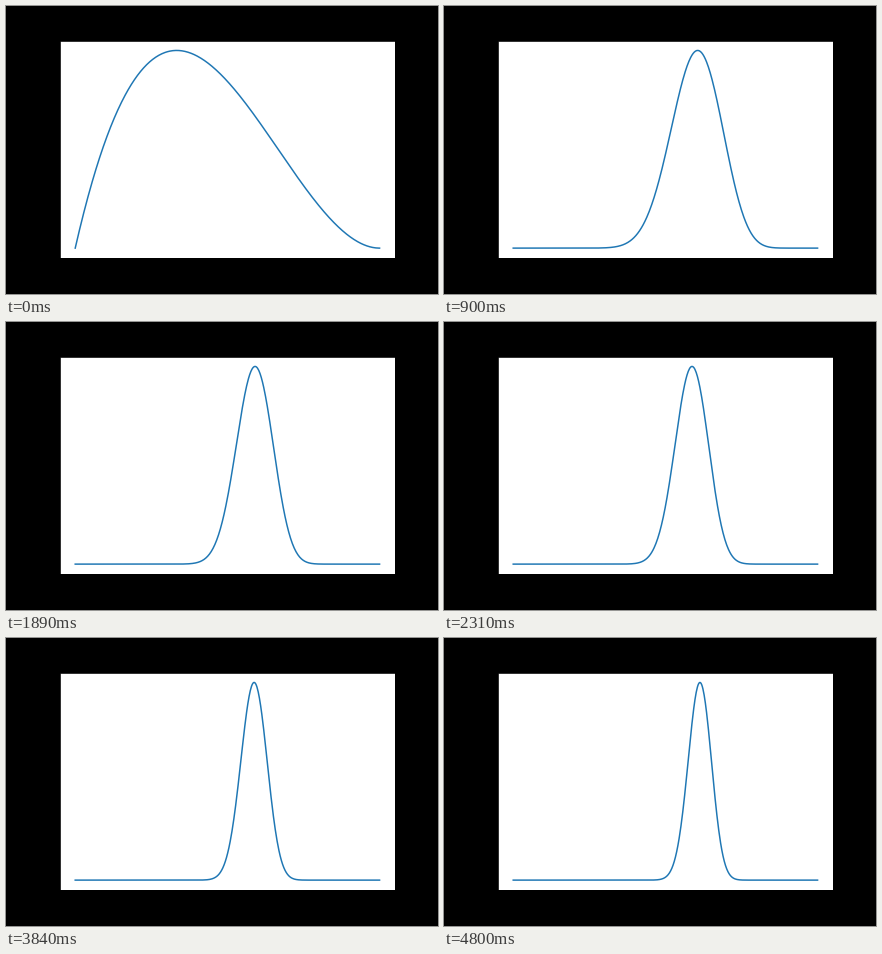
These frames come from a looping animation (432x288 px, 4830 ms). A matplotlib script:

```python
import numpy as np
import matplotlib.pyplot as plt
from matplotlib.animation import FuncAnimation

FRAMES, INTERVAL = 161, 30
FIRST_TOSSES = 3

# Running head count of a biased coin at a few toss counts.
TOSSES = [3, 33, 40, 52, 80, 94, 107, 131, 147, 163]
HEADS = [1, 20, 25, 30, 47, 55, 60, 77, 90, 100]

p = np.linspace(0, 1, 500)


def posterior(heads, tosses):
    """Beta density of the coin's bias, scaled to a peak of one."""
    density = p**heads * (1 - p)**(tosses - heads)
    return density / density.max()


def update(frame):
    tosses = FIRST_TOSSES + frame
    heads = int(np.floor(np.interp(tosses, TOSSES, HEADS) + 0.5))
    line.set_data(p, posterior(heads, tosses))
    return (line,)


fig, ax = plt.subplots(figsize=(6, 4), dpi=72, facecolor="black")
fig.subplots_adjust(left=0.125, right=0.9, bottom=0.125, top=0.88)
ax.set(xlim=(-0.05, 1.05), ylim=(-0.05, 1.05), xticks=[], yticks=[])
line, = ax.plot([], [], color="#1f77b4", lw=1.5)

anim = FuncAnimation(fig, update, frames=FRAMES, interval=INTERVAL,
                     repeat=True, repeat_delay=0)
plt.show()
```
